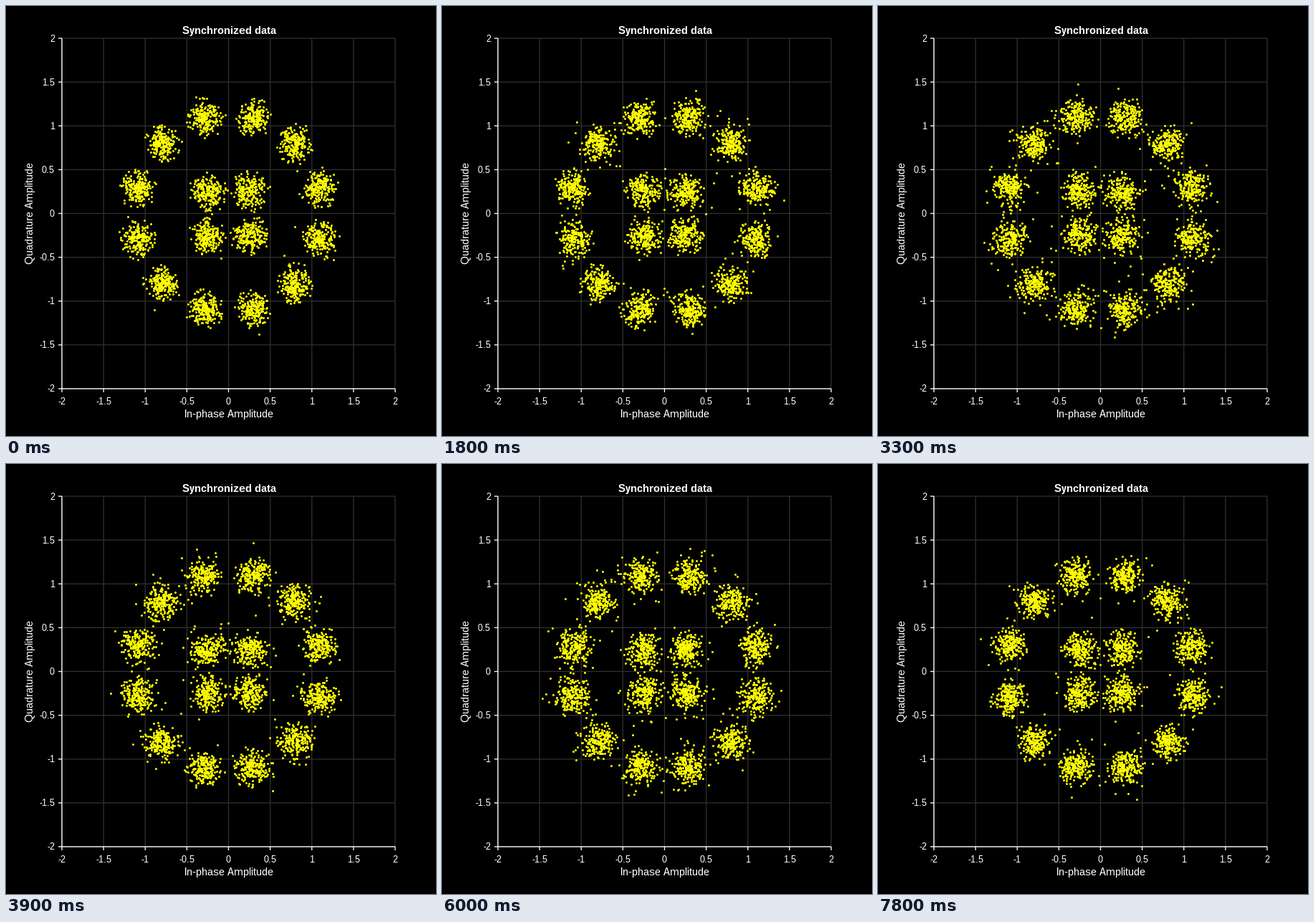
These frames come from a looping animation (600 px wide and 600 px high, 8 s). A matplotlib script:

```python
import numpy as np
import matplotlib.pyplot as plt
from matplotlib.animation import FuncAnimation

SIZE, DPI = 600, 100
LEFT, RIGHT, TOP, BOTTOM = 78, 543, 45, 534
PX = 72 / DPI
GRID = "#303030"
TICKS = np.linspace(-2, 2, 9)
POINTS = 215
STEP_TICKS = 3  # a new burst every 300 ms

plt.rcParams["font.family"] = "Liberation Sans"
plt.rcParams["text.hinting"] = "native"
plt.rcParams["text.hinting_factor"] = 1

fig = plt.figure(figsize=(SIZE / DPI, SIZE / DPI), dpi=DPI, facecolor="black")
ax = fig.add_axes([0, 0, 1, 1])
ax.set_xlim(0, SIZE)
ax.set_ylim(SIZE, 0)
ax.axis("off")


def to_x(value):
    return LEFT + (value + 2) / 4 * (RIGHT - LEFT)


def to_y(value):
    return BOTTOM - (value + 2) / 4 * (BOTTOM - TOP)


def line(x0, y0, x1, y1, color="white", z=1):
    ax.plot([x0, x1], [y0, y1], color=color, lw=1.33 * PX, snap=False,
            solid_capstyle="butt", zorder=z)


def label(x, y, text, size, ha="center", **style):
    ax.text(x, y, text, fontsize=size * PX, color="white", ha=ha,
            va="baseline", rotation_mode="anchor", zorder=5, **style)


def draw_axes():
    for value in TICKS:
        x, y = to_x(value), to_y(value)
        line(x, TOP, x, BOTTOM, GRID)
        line(LEFT, y, RIGHT, y, GRID)
        line(x, BOTTOM, x, BOTTOM + 5, z=2)
        line(LEFT - 5, y, LEFT, y, z=2)
        label(x, 556, f"{value:g}", 13.33)
        label(68, y + 4.5, f"{value:g}", 13.33, ha="right")
    line(LEFT, TOP, LEFT, BOTTOM + 0.6, z=2)
    line(LEFT, BOTTOM, RIGHT, BOTTOM, z=2)
    label(311.5, 39, "Synchronized data", 14.67, weight="bold")
    label(311, 574, "In-phase Amplitude", 14.67)
    label(38, 289, "Quadrature Amplitude", 14.67, rotation=90)


def ring(radius, count):
    angle = (np.arange(count) + 0.5) * 2 * np.pi / count
    return radius * np.exp(1j * angle)


SYMBOLS = np.repeat(np.concatenate([ring(0.355, 4), ring(1.13, 12)]), POINTS)


def burst(step):
    """Noisy symbols; a varying share of them strays from its cluster."""
    rng = np.random.default_rng(100 + step)
    count = len(SYMBOLS)
    radius = 0.095 * np.sqrt(-2 * np.log(1 - rng.random(count) * 0.96))
    stray = np.interp(step, [0, 6, 11, 13, 17, 20, 26],
                      [0.02, 0.08, 0.2, 0.12, 0.18, 0.2, 0.1])
    radius *= np.where(rng.random(count) < stray, 1.65, 1)
    return SYMBOLS + radius * np.exp(2j * np.pi * rng.random(count))


draw_axes()
dots, = ax.plot([], [], "o", color="yellow", ms=3 * PX, mew=0, zorder=3)


def update(frame):
    data = burst(frame // STEP_TICKS)
    dots.set_data(to_x(data.real), to_y(data.imag))
    return dots,


anim = FuncAnimation(fig, update, frames=80, interval=100, repeat=True,
                     repeat_delay=0, blit=False)
plt.show()
```
